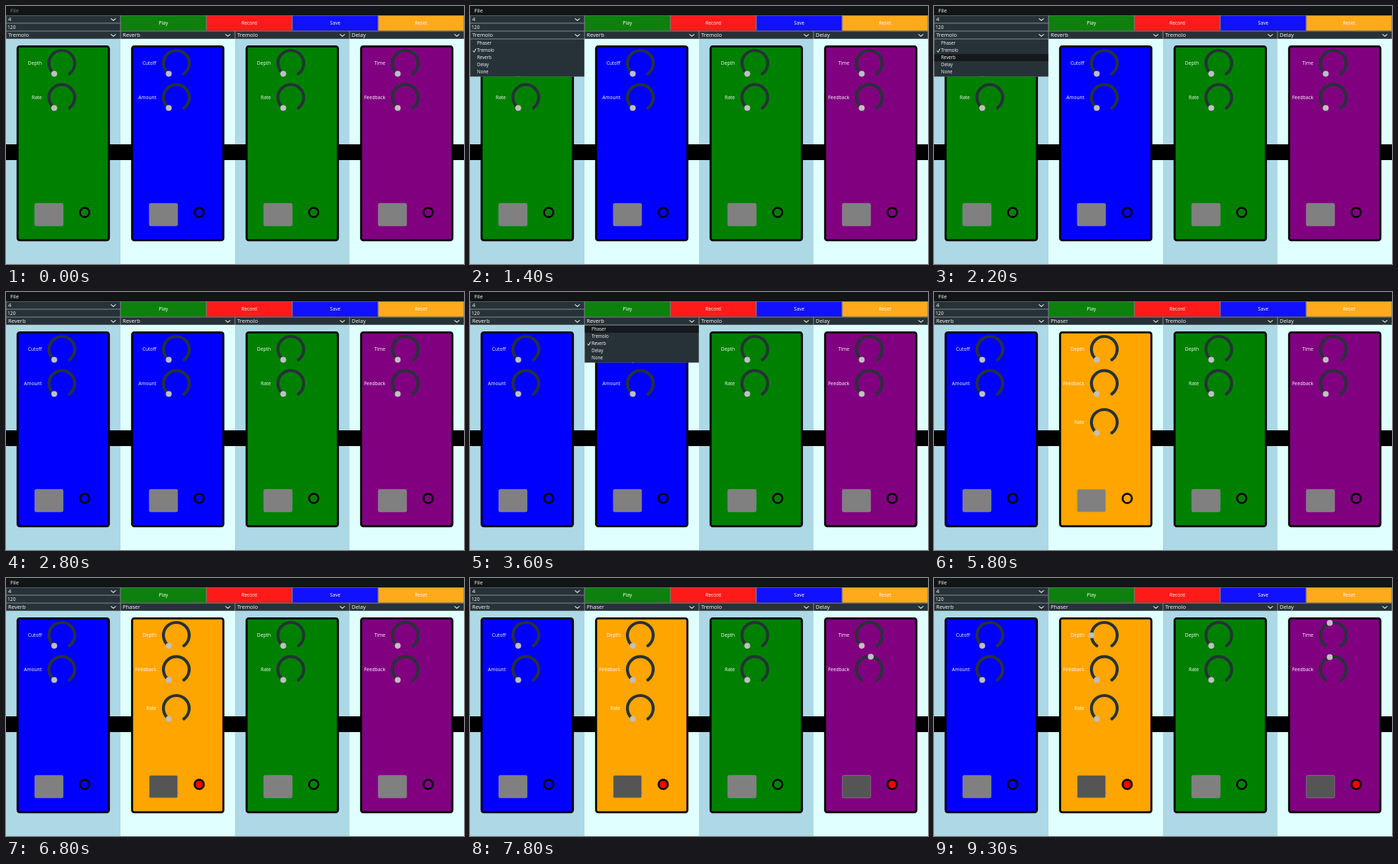
Recreate the animation shown at these times as an HTML page. Size 640 by 360 pixels, loop 9.4 s.

```html
<!DOCTYPE html>
<html lang="en">
<head>
<meta charset="utf-8">
<title>Pedal board</title>
<style>
html, body { margin: 0; width: 100%; height: 100%; overflow: hidden; background: #000; }
svg { display: block; width: 640px; height: 360px; }
text { font: 500 6.7px "Open Sans", "Noto Sans", sans-serif; fill: #fff; }
.big { font-size: 7.6px; }
.item { font-size: 6.2px; }
</style>
</head>
<body>
<svg id="stage" viewBox="0 0 640 360"></svg>
<script>
const LOOP = 9400, STEP = 100;
const DARK = '#263238', LINE = '#8e989b';
const EFFECTS = {
  Phaser: { color: '#ffa500', knobs: ['Depth', 'Feedback', 'Rate'] },
  Tremolo: { color: '#008000', knobs: ['Depth', 'Rate'] },
  Reverb: { color: '#0000ff', knobs: ['Cutoff', 'Amount'] },
  Delay: { color: '#800080', knobs: ['Time', 'Feedback'] }
};
const MENU = [...Object.keys(EFFECTS), 'None'];
const KNOB_Y = [80, 127.7, 182];
const REST = -144;

const rect = (x, y, w, h, fill, extra = '') =>
  `<rect x="${x}" y="${y}" width="${w}" height="${h}" fill="${fill}" ${extra}/>`;
const text = (x, y, label, extra = '') => `<text x="${x}" y="${y}" ${extra}>${label}</text>`;
const polar = (y, deg, r = 18) => {
  const a = deg * Math.PI / 180;
  return [78 + r * Math.sin(a), y - r * Math.cos(a)].map(v => v.toFixed(2));
};

// Piecewise linear value through [time, value] points.
function track(t, points) {
  if (t <= points[0][0]) return points[0][1];
  for (let i = 1; i < points.length; i++) {
    const [t0, a] = points[i - 1], [t1, b] = points[i];
    if (t < t1) return a + (b - a) * (t - t0) / (t1 - t0);
  }
  return points[points.length - 1][1];
}

function combo(x, y, label) {
  return rect(x + .25, y + .25, 159.5, 10.5, DARK, `stroke="${LINE}" stroke-width=".5"`) +
    text(x + 3, y + 8.3, label, 'class="big"') +
    `<path d="M${x + 146.5} ${y + 4.4}l3.5 2.8 3.5-2.8" fill="none" stroke="#e8eaeb" stroke-width="1.1"/>`;
}

function button(x, label, fill) {
  return rect(x + .25, 13.25, 119.5, 21.3, fill, `stroke="${LINE}" stroke-width=".5"`) +
    text(x + 60, 26.3, label, 'text-anchor="middle"');
}

function knob(label, y, deg) {
  const [cx, cy] = polar(y, deg);
  return text(50, y + 2.4, label, 'text-anchor="end"') +
    `<path d="M${polar(y, REST)}A18 18 0 1 1 ${polar(y, -REST)}" fill="none" stroke="${DARK}" stroke-width="4.2" stroke-linecap="round"/>` +
    `<circle cx="${cx}" cy="${cy}" r="4.1" fill="#c0c0c0"/>`;
}

function pedal(column, name, on, angles = []) {
  const { color, knobs } = EFFECTS[name];
  return `<g transform="translate(${column * 160})">` +
    rect(16.2, 56.4, 127.6, 270.4, color, 'rx="3" stroke="#000" stroke-width="2.8"') +
    knobs.map((label, i) => knob(label, KNOB_Y[i], angles[i] ?? REST)).join('') +
    rect(40.2, 275.4, 39.6, 31.4, on ? '#555' : '#808080', `rx="2" stroke="${LINE}" stroke-width=".6"`) +
    `<circle cx="110" cy="288" r="6.5" fill="${on ? '#f00' : 'none'}" stroke="#000" stroke-width="2.6"/></g>`;
}

function popup(column, checked, hover) {
  return `<g transform="translate(${column * 160} 46)">` +
    rect(.25, .25, 159.5, 52, DARK, 'stroke="#59646a" stroke-width=".5"') +
    MENU.map((name, i) => {
      const y = 1 + i * 10;
      return (name === hover ? rect(.5, y, 159, 10, '#15191b') : '') +
        (name === checked ? `<path d="M4.2 ${y + 5.4}l1.6 2 2.6-4.8" fill="none" stroke="#fff" stroke-width="1"/>` : '') +
        text(10, y + 7.2, name, 'class="item"');
    }).join('') + '</g>';
}

function scene(t) {
  const names = [t < 2300 ? 'Tremolo' : 'Reverb', t < 4300 ? 'Reverb' : 'Phaser', 'Tremolo', 'Delay'];
  const on = [false, t >= 6300, false, t >= 6900];
  const depth = track(t, [[8800, REST], [9200, -90]]);
  const time = track(t, [[8000, REST], [8500, -16]]);
  const feedback = track(t, [[7200, REST], [7700, 6.5], [7800, 6.5], [7900, -16]]);
  const angles = [[], [depth], [], [time, feedback]];

  let s = [0, 1, 2, 3].map(i => rect(i * 160, 46, 160, 314, i % 2 ? '#e0ffff' : '#add8e6')).join('');
  s += rect(0, 193, 640, 22, '#000');
  s += names.map((name, i) => pedal(i, name, on[i], angles[i])).join('');
  s += rect(0, 0, 640, 13, '#121516') +
    text(6, 9.2, 'File', `class="big" style="fill:${t < 600 ? '#7c7f80' : '#fff'}"`);
  s += combo(0, 13, '4') +
    rect(.25, 24.25, 159.5, 10.5, DARK, `stroke="${LINE}" stroke-width=".5"`) + text(2, 31.6, '120');
  s += button(160, 'Play', '#0d800d') + button(280, 'Record', '#ff1a1a') +
    button(400, 'Save', '#1111ff') + button(520, 'Reset', '#ffaa1a');
  s += names.map((name, i) => combo(i * 160, 35, name)).join('');
  if (t >= 1300 && t < 2300) s += popup(0, 'Tremolo', t < 1600 ? '' : t < 1800 ? 'Tremolo' : 'Reverb');
  if (t >= 3300 && t < 4300) s += popup(1, 'Reverb', t < 3500 ? '' : 'Phaser');
  return s;
}

const stage = document.getElementById('stage');
let last = -1;
function tick() {
  const t = Math.floor(performance.now() % LOOP / STEP) * STEP;
  if (t !== last) stage.innerHTML = scene(last = t);
  requestAnimationFrame(tick);
}
tick();
</script>
</body>
</html>
```
